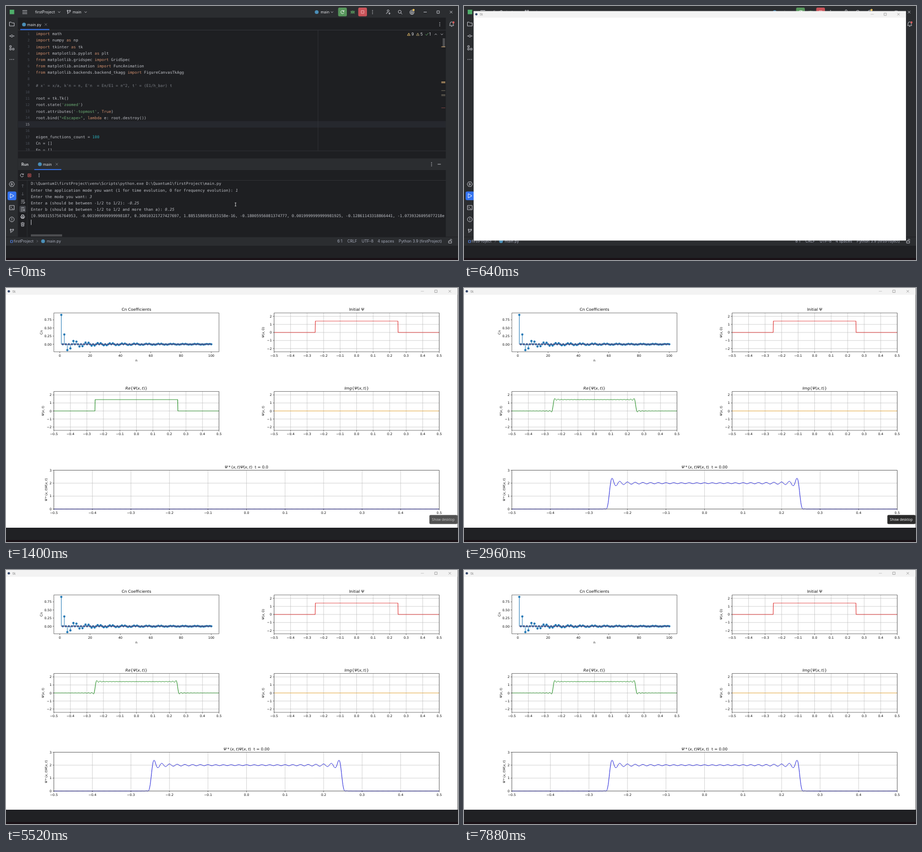
Animation, 854 px wide and 480 px high, one loop 8000 ms. Source, as an HTML page with a canvas:

```html
<!DOCTYPE html>
<html lang="en">
<head>
<meta charset="utf-8">
<title>Wave packet run</title>
<style>
html, body { margin: 0; width: 100%; height: 100%; overflow: hidden; background: #1e1f22; }
canvas { display: block; }
</style>
</head>
<body>
<canvas id="stage" width="854" height="480"></canvas>
<script>
const ctx = document.getElementById('stage').getContext('2d');
const LOOP = 8000;
const UI = 'Inter, sans-serif', MONO = '"DejaVu Sans Mono", monospace', PLOT = '"DejaVu Sans", sans-serif';
const PANEL = '#2b2d30', EDITOR = '#1e1f22', TEXT = '#bcbec4', ICON = '#ced0d6', DIM = '#5a5d63';
const clamp = (v, lo = 0, hi = 1) => Math.min(hi, Math.max(lo, v));

function rect(x, y, w, h, color, r = 0) {
  ctx.fillStyle = color;
  ctx.beginPath();
  ctx.roundRect(x, y, w, h, r);
  ctx.fill();
}
function dot(x, y, r, color) {
  ctx.fillStyle = color;
  ctx.beginPath();
  ctx.arc(x, y, r, 0, 2 * Math.PI);
  ctx.fill();
}
// y is the middle of the capital letters
function text(str, x, y, { size = 7.25, font = UI, color = '#dfe1e5', align = 'left', style = '' } = {}) {
  ctx.font = `${style} ${size}px ${font}`;
  ctx.fillStyle = color;
  ctx.textAlign = align;
  ctx.fillText(str, x, y + size * 0.36);
}
function icon(path, x, y, color = ICON, width = 0.9) {
  ctx.save();
  ctx.translate(x, y);
  ctx.strokeStyle = color;
  ctx.lineWidth = width;
  ctx.stroke(new Path2D(path));
  ctx.restore();
}
function dots(x, y, dx, dy) {
  for (const k of [-1, 0, 1]) dot(x + k * dx, y + k * dy, 0.8, ICON);
}
const circle = r => `M${r} 0A${r} ${r} 0 1 1 ${-r} 0A${r} ${r} 0 1 1 ${r} 0`;
const SHAPE = {
  chevron: 'M-2-1L0 1L2-1', up: 'M-2 1L0-1L2 1', next: 'M-1-2L1 0L-1 2',
  cross: 'M-2.3-2.3L2.3 2.3M2.3-2.3L-2.3 2.3', minus: 'M-3 0H3', square: 'M-2.3-2.3H2.3V2.3H-2.3Z',
  menu: 'M-4.5-3H4.5M-4.5 0H4.5M-4.5 3H4.5',
  branch: 'M-2-1.5V3.5M-2 1.5Q2.3 1.5 2.3-1M-3-3.5H-1V-1.5H-3ZM1.3-3.5H3.3V-1.5H1.3Z',
  rerun: 'M2.8-1.5A3 3 0 1 0 3 1M3-3.5V-1.2H.7',
  search: 'M2.2-.6A2.8 2.8 0 1 1-3.4-.6A2.8 2.8 0 1 1 2.2-.6M1.4 1.4L4 4',
  user: 'M1.8-2A1.8 1.8 0 1 1-1.8-2A1.8 1.8 0 1 1 1.8-2M-3.5 4Q-3.5 1 0 1M2.5 1V5M.5 3H4.5',
  folder: 'M-4.5-3.5H-1L.3-2H4.5V3.8H-4.5Z',
  commit: 'M-5 0H-2M2 0H5' + circle(2),
  modules: 'M-4-4H-1V-1H-4ZM-4 1H-1V4H-4ZM1.2 1H4.2V4H1.2Z',
  hexagon: 'M-2.5-4.3H2.5L5 0L2.5 4.3H-2.5L-5 0ZM-1-2L2 0L-1 2Z',
  play: 'M-3-4L4 0L-3 4Z',
  terminal: 'M-4.5-4H4.5V4H-4.5ZM-2.5-2L-.7-.3L-2.5 1.4M.3 2H2.7',
  problem: circle(4.5) + 'M0-2.5V.8M0 1.8V2.8',
  bell: 'M-4 3H4Q3 2 3-1A3 3 0 0 0-3-1Q-3 2-4 3M-1 4.6H1',
  warning: 'M0-2.4L2.7 2.2H-2.7ZM0-.8V.7',
  lock: 'M-2.8-.5H2.8V3.5H-2.8ZM0-.5V-2A1.7 1.7 0 0 1 3.4-2',
  arrow: 'M0 3V-3M-2-1L0-3L2-1', wrap: 'M-3-3H3.5M-3 0H2Q4 0 4 1.5T2 3H0M-3 3H-1.5',
  bottom: 'M-3-3H3M-3 0H0M-3 3H0M2.5-1V3M1 1.7L2.5 3L4 1.7',
  print: 'M-2-1V-3.5H2V-1M-3.5-1H3.5V2H-3.5ZM-2 1H2V3.5H-2Z',
  bin: 'M-3.5-2.5H3.5M-1-3.5H1M-2.6-2L-2.2 3.6H2.2L2.6-2M-.8-1V2M.8-1V2'
};
const put = (name, x, y, color, width) => icon(SHAPE[name], x, y, color, width);

const CODE = `import math
import numpy as np
import tkinter as tk
import matplotlib.pyplot as plt
from matplotlib.gridspec import GridSpec
from matplotlib.animation import FuncAnimation
from matplotlib.backends.backend_tkagg import FigureCanvasTkAgg

# x' = x/a, k'n = n, E'n  = En/E1 = n^2, t' = (E1/h_bar) t

root = tk.Tk()
root.state('zoomed')
root.attributes('-topmost', True)
root.bind("<Escape>", lambda e: root.destroy())


eigen_functions_count = 100
Cn = []
En = []`.split('\n');
const TOKEN = /(#.*)|('[^']*'|"[^"]*")|\b(import|from|as|lambda|True)\b|\b(\d+)\b|[^\s'"#\w]+|\w+|\s+/g;
const TOKEN_COLORS = ['#7a7e85', '#6aab73', '#cf8e6d', '#2aacb8'];
const CHAR = 4.444, MONO_SIZE = 7.38;

function codeLine(line, x, y) {
  for (const m of line.matchAll(TOKEN)) {
    const kind = m.slice(1, 5).findIndex(Boolean);
    text(m[0], x + m.index * CHAR, y, { size: MONO_SIZE, font: MONO, color: TOKEN_COLORS[kind] || TEXT });
  }
}

const CONSOLE = [
  ['D:\\Quantum1\\firstProject\\venv\\Scripts\\python.exe D:\\Quantum1\\firstProject\\main.py'],
  ['Enter the application mode you want (1 for time evolution, 0 for frequency evolution): ', '1'],
  ['Enter the mode you want: ', '3'],
  ['Enter a (should be between -1/2 to 1/2): ', '-0.25'],
  ['Enter b (should be between -1/2 to 1/2 and more than a): ', '0.25'],
  ['[0.9003155756764953, -0.001999999999998187, 0.30010321727427697, 1.8851586958135158e-16, ' +
   '-0.18005956081374777, 0.0019999999999981925, -0.12861143318866441, -1.0739326095077218e'],
  ['0.9021303782142405']
];

function drawTopBar() {
  rect(0, 0, 854, 22, PANEL);
  rect(7, 7, 8.5, 8.5, '#4fae6a');
  put('menu', 35.5, 11.5);
  text('firstProject', 55, 11.5);
  put('chevron', 100.5, 11.5);
  put('branch', 118.5, 11.5);
  text('main', 126, 11.5);
  put('chevron', 150.5, 11.5);
  dot(587, 11.5, 3.6, '#4b8fb8');
  text('main', 594.5, 11.5);
  put('chevron', 616, 11.5);
  rect(627.5, 3, 16.5, 16.5, '#57965c', 2.5);
  put('rerun', 635.5, 11.5, '#fff');
  icon(circle(2.4) + 'M0-2V2M-4-2L-2-1M4-2L2-1M-4 0H4M-4 3L-2 1.5M4 3L2 1.5', 655, 11.5, '#5fa765');
  rect(665.5, 3, 16.5, 16.5, '#c95359', 2.5);
  icon('M-2.5-2.5H2.5V2.5H-2.5Z', 673.7, 11.3, '#f2b8b8');
  dots(692.5, 11.5, 0, 3);
  put('user', 722, 11);
  put('search', 744.5, 11.5);
  icon(circle(1.6) + circle(3.8), 767, 11.8, ICON, 1.1);
  dot(770, 7.5, 2, '#f2c55c');
  put('minus', 792, 11.5);
  put('square', 816.5, 11.5);
  put('cross', 841, 11.5);
}

function drawSideBars() {
  rect(0, 22, 22.5, 415, PANEL);
  rect(831, 22, 23, 415, PANEL);
  put('folder', 11, 34);
  put('commit', 11, 56.7);
  put('modules', 11, 79);
  dots(11, 101, 3.4, 0);
  put('hexagon', 11, 336.7);
  rect(3, 350.5, 16.5, 16.5, '#3574f0', 3);
  put('play', 11, 358.7, '#fff');
  put('terminal', 11, 381);
  put('problem', 11, 403.3);
  put('branch', 11, 425.3);
  put('bell', 842, 34);
  dot(845.5, 31, 1.9, '#db5c5c');
}

function drawEditor() {
  rect(22.5, 45, 808.5, 0.7, '#393b40');
  dot(34, 35, 3.6, '#4b8fb8');
  text('main.py', 40, 35);
  icon(SHAPE.cross, 75.3, 35, '#868a91', 0.7);
  rect(27, 43.6, 55, 1.8, '#3574f0');
  dots(819.5, 34.5, 0, 3);

  ctx.save();
  ctx.beginPath();
  ctx.rect(22.5, 46, 808.5, 227.5);
  ctx.clip();
  rect(22.5, 217.5, 808.5, 12.2, '#26282e');
  rect(589.3, 46, 0.7, 230, '#35373b');
  CODE.forEach((line, i) => {
    const y = 52.6 + 12.19 * i;
    text(i + 1, 44.6, y, { size: 6.6, font: MONO, color: i === 14 ? '#a1a3ab' : '#4b5059', align: 'right' });
    codeLine(line, 56.4, y);
  });
  ctx.restore();

  put('warning', 761, 53.5, '#e0b765');
  text('9', 766, 53.5);
  put('warning', 778, 53.5, '#a8976a');
  text('5', 783, 53.5);
  icon('M-2.5 0L-.5 2L3-2.5', 795, 53.5, '#5fa765');
  text('1', 799.5, 53.5);
  put('up', 812, 53.5);
  put('chevron', 823.5, 53.5);
  rect(825, 61, 4.5, 17, '#4d4e51');
  for (const y of [76.5, 142.8, 144.6]) rect(822.5, y, 7.5, 1.2, '#c9a26d');
  for (const y of [159.5, 167, 169]) rect(822.5, y, 7.5, 0.8, '#8c8470');
  rect(822.5, 192, 7.5, 0.8, '#8a4a48');
  rect(22.5, 273.5, 808.5, 0.7, '#34363a');
}

function drawRunPanel(printed) {
  rect(22.5, 288, 808.5, 22, PANEL);
  text('Run', 29, 299, { style: '600' });
  dot(64, 299, 3.6, '#4b8fb8');
  text('main', 70, 299);
  icon(SHAPE.cross, 96, 299, '#868a91', 0.7);
  rect(53.5, 308.3, 51, 1.8, '#3574f0');
  dots(804, 299, 0, 3);
  put('minus', 818.5, 299);

  put('rerun', 30, 320);
  icon('M-2.8-2.8H2.8V2.8H-2.8ZM-1-1H1V1H-1Z', 44.3, 320, '#db5c5c');
  dots(62.5, 320, 0, 2.6);
  rect(22.5, 329, 808.5, 0.7, '#34363a');
  rect(39.7, 329, 0.7, 108, '#34363a');
  put('arrow', 31.5, 340, DIM);
  icon('M0-3V3M-2 1L0 3L2 1', 31.5, 355, DIM);
  put('wrap', 31.5, 370);
  rect(25.5, 377.5, 12, 12.5, '#43454a', 2);
  put('bottom', 31.5, 384);
  put('print', 31.5, 398);
  put('bin', 31.5, 412.5);

  ctx.save();
  ctx.beginPath();
  ctx.rect(40, 330, 790, 106);
  ctx.clip();
  CONSOLE.slice(0, printed).forEach(([prompt, answer], i) => {
    const y = 335.7 + 12.2 * i, font = { size: MONO_SIZE, font: MONO, color: TEXT };
    text(prompt, 47, y, font);
    if (answer) text(answer, 47 + prompt.length * CHAR, y, { ...font, style: 'italic' });
  });
  rect(47, 330.6 + 12.2 * printed, 0.9, 10, '#ced0d6');
  ctx.restore();
  rect(47, 431.5, 59, 4, '#4d4e51');
}

function drawStatusBar(position) {
  const gray = { color: '#a8adbd' };
  rect(0, 436.3, 854, 17, PANEL);
  rect(0, 436.3, 854, 0.7, EDITOR);
  icon('M-2-2H2V2H-2Z', 10.5, 445, '#548af7');
  text('firstProject', 14.5, 444.5, gray);
  put('next', 59, 444.5, '#868a91', 0.7);
  dot(70, 444.5, 3.6, '#4b8fb8');
  text('main.py', 77, 444.5, gray);
  text(position, 626, 444.5, gray);
  text('CRLF', 645, 444.5, gray);
  text('UTF-8', 672, 444.5, gray);
  text('4 spaces', 702, 444.5, gray);
  text('Python 3.9 (firstProject)', 742, 444.5, gray);
  put('lock', 839, 444.5);
}

function drawIde(t) {
  const finished = t >= 520;
  rect(0, 0, 854, 480, EDITOR);
  drawTopBar();
  drawSideBars();
  drawEditor();
  drawRunPanel(finished ? 7 : 6);
  drawStatusBar(finished ? '8:1' : '6:1');
  const p = clamp((t - 40) / 400), move = p * p * (3 - 2 * p);
  if (p < 1) icon('M-1.5-3H1.5M0-3V3M-1.5 3H1.5', 433.7 + 420 * move, 375 + 105 * move, '#e8e8e8', 0.8);
}

// Text with _italic_ parts, centred on x
function mathText(str, x, y, size) {
  const parts = str.split('_').map((s, i) => ({ s, style: i % 2 ? 'italic' : '' }));
  for (const p of parts) {
    ctx.font = `${p.style} ${size}px ${PLOT}`;
    p.w = ctx.measureText(p.s).width;
  }
  x -= parts.reduce((sum, p) => sum + p.w, 0) / 2;
  for (const { s, style, w } of parts) {
    text(s, x, y, { size, font: PLOT, color: '#111', style });
    x += w;
  }
}
function line(points, color, width) {
  ctx.strokeStyle = color;
  ctx.lineWidth = width;
  ctx.lineJoin = 'round';
  ctx.beginPath();
  for (const [x, y] of points) ctx.lineTo(x, y);
  ctx.stroke();
}
const label = (v, digits) => v.toFixed(digits).replace(/^-0\.0$/, '0.0').replace('-', '\u2212');
const range = (from, step, count) => Array.from({ length: count }, (_, i) => from + step * i);

function axes({ x, y, w, h, x0, kx, y0, ky, xs, ys, xDigits, yDigits, grid, title, yLabel, yLabelX, draw }) {
  const px = v => x0 + kx * v, py = v => y0 - ky * v;
  const small = { size: 6.17, font: PLOT, color: '#111' };
  if (grid) {
    for (const v of xs) line([[px(v), y], [px(v), y + h]], '#b0b0b0', 0.55);
    for (const v of ys) line([[x, py(v)], [x + w, py(v)]], '#b0b0b0', 0.55);
  }
  draw(px, py);
  for (const v of xs) {
    line([[px(v), y + h], [px(v), y + h + 2.2]], '#222', 0.6);
    text(label(v, xDigits), px(v), y + h + 7, { ...small, align: 'center' });
  }
  for (const v of ys) {
    line([[x, py(v)], [x - 2.2, py(v)]], '#222', 0.6);
    text(label(v, yDigits), x - 4.3, py(v), { ...small, align: 'right' });
  }
  ctx.strokeStyle = '#222';
  ctx.lineWidth = 0.6;
  ctx.strokeRect(x, y, w, h);
  mathText(title, x + w / 2, y - 6.3, 7.4);
  ctx.save();
  ctx.translate(yLabelX, y + h / 2);
  ctx.rotate(-Math.PI / 2);
  mathText(yLabel, 0, 0, 6.17);
  ctx.restore();
}

const coefficient = n => n % 2 ? 4 / (n * Math.PI) * Math.sin(n * Math.PI / 4) : 0;
const XS = range(-0.5, 1 / 800, 801);
const SERIES = XS.map(x => {
  let sum = 0;
  for (let n = 1; n < 100; n += 2) sum += coefficient(n) * Math.SQRT2 * Math.cos(n * Math.PI * x);
  return sum;
});
const STEP = XS.map(x => Math.abs(x) <= 0.25 ? Math.SQRT2 : 0);
const ZERO = XS.map(() => 0);
const curve = (values, color) => (px, py) => line(XS.map((x, i) => [px(x), py(values[i])]), color, 0.95);

function wavePlot(x, y, title, yLabel, values, color) {
  axes({ x, y, w: 312, h: 73.5, x0: x + 156, kx: 312, y0: y + 36.9, ky: 15.2, grid: true,
    xs: range(-0.5, 0.1, 11), ys: range(-2, 1, 5), xDigits: 1, yDigits: 0,
    title, yLabel, yLabelX: x - 20.3, draw: curve(values, color) });
}
function drawStems(px, py) {
  const ns = range(1, 1, 100);
  for (const n of ns) line([[px(n), py(0)], [px(n), py(coefficient(n))]], '#1f77b4', 0.95);
  for (const n of ns) dot(px(n), py(coefficient(n)), 2.1, '#1f77b4');
  line([[px(1), py(0)], [px(100), py(0)]], 'rgba(150,40,70,.75)', 0.95);
}

const PSI = '_Ψ_(_x_,\u2009_t_)';
const DENSITY = `_Ψ_\u2009*\u2009(_x_,\u2009_t_)${PSI}`;

function drawFigure(evolved) {
  axes({ x: 90.4, y: 47.1, w: 312, h: 73.5, x0: 101.6, kx: 2.863, y0: 106.3, ky: 61.6,
    xs: range(0, 20, 6), ys: range(0, 0.25, 4), xDigits: 0, yDigits: 2,
    title: 'Cn Coefficients', yLabel: 'Cn', yLabelX: 66.7, draw: drawStems });
  mathText('n', 246.3, 137, 6.17);
  wavePlot(506.5, 47.1, 'Initial Ψ', '_Ψ_(_x_,\u20090)', STEP, '#dc1c1c');
  wavePlot(90.4, 195.5, `_Re_{${PSI}}`, PSI, evolved ? SERIES : STEP, '#0a800a');
  wavePlot(506.5, 195.5, `_Img_{${PSI}}`, PSI, ZERO, '#f5a61c');
  axes({ x: 90.4, y: 344.4, w: 728.1, h: 73.3, x0: 454.45, kx: 728.1, y0: 417.7, ky: 24.43, grid: true,
    xs: range(-0.5, 0.1, 11), ys: range(0, 1, 4), xDigits: 1, yDigits: 0,
    title: `${DENSITY}  t = ${evolved ? '0.00' : '0.0'}`, yLabel: DENSITY, yLabelX: 75.5,
    draw: curve(evolved ? SERIES.map(v => v * v) : ZERO, '#1616d6') });
}

function drawWindow(t) {
  const scale = t < 800 ? 1 - 0.087 * 2 ** ((600 - t) / 40) : 1;
  ctx.save();
  ctx.globalAlpha = clamp((t - 580) / 60);
  ctx.translate(426.7, 226.4);
  ctx.scale(scale, scale);
  ctx.translate(-426.7, -226.4);
  rect(0, 0, 853.3, 453, '#fff');
  rect(0, 0, 853.3, 12.8, '#f3f3f3');
  dot(5.3, 6.2, 2.3, '#35476b');
  text('tk', 12.3, 6.5, { size: 6.7, font: '"Open Sans", sans-serif', color: '#858585' });
  put('minus', 786.7, 6.2, '#aaa', 0.6);
  put('square', 812.3, 6.2, '#777', 0.6);
  put('cross', 838.5, 6.2, '#777', 0.6);
  if (t >= 1200) drawFigure(t >= 2900);
  ctx.restore();
}

function drawTooltip(t) {
  ctx.save();
  ctx.globalAlpha = clamp(Math.min((t - 1300) / 150, (3840 - t) / 160));
  rect(799.7, 428.7, 53.6, 17.6, '#777', 2.5);
  rect(800.2, 429.2, 52.6, 16.6, '#2b2b2b', 2);
  text('Show desktop', 826.3, 437.3, { size: 6.6, font: '"Open Sans", sans-serif', color: '#fff', align: 'center' });
  ctx.restore();
}

function frame(now) {
  const t = now % LOOP;
  if (t < 800) drawIde(t);
  else rect(0, 0, 854, 480, PANEL);
  if (t > 580) drawWindow(t);
  if (t > 1300 && t < 3840) drawTooltip(t);
  rect(0, 453, 854, 27, '#202124');
  rect(0, 476.3, 854, 3.7, '#1a1116');
  requestAnimationFrame(frame);
}
requestAnimationFrame(frame);
</script>
</body>
</html>
```
